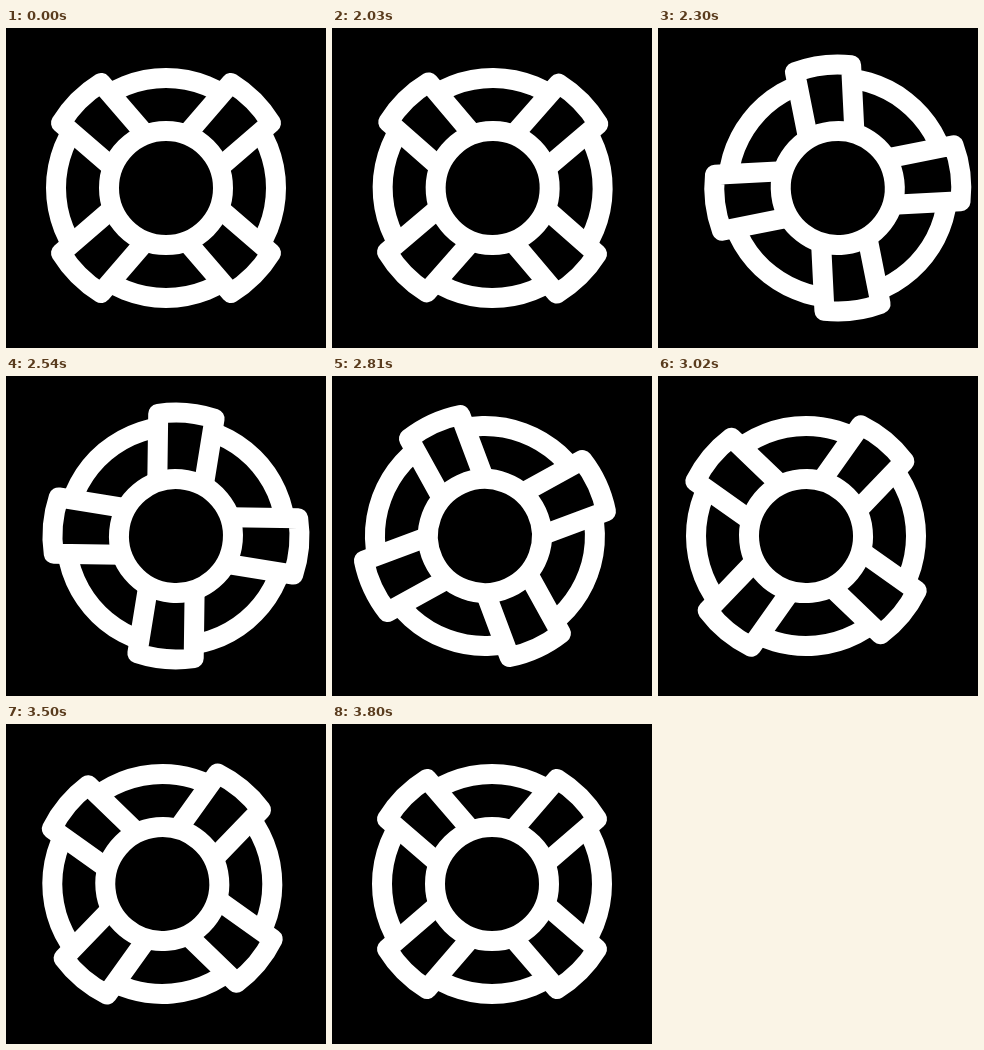
These frames come from a looping animation (320 by 320 pixels, 3.83 s). An HTML page:

```html
<!DOCTYPE html>
<html lang="en">
<head>
<meta charset="utf-8">
<title>Lifebuoy</title>
<style>
  html, body { margin: 0; width: 100%; height: 100%; overflow: hidden; background: #000; }
  svg { display: block; width: 100vw; height: 100vh; }
</style>
</head>
<body>
<svg viewBox="0 0 320 320">
  <defs>
    <path id="band" d="M-21 -54 L-65 -105 A123.5 123.5 0 0 0 -105 -65 L-54 -21"/>
  </defs>
  <g id="buoy" transform="translate(160 160)" fill="#000" stroke="#fff" stroke-width="20" stroke-linejoin="round">
    <circle r="110"/>
    <use href="#band"/>
    <use href="#band" transform="rotate(90)"/>
    <use href="#band" transform="rotate(180)"/>
    <use href="#band" transform="rotate(270)"/>
    <circle r="57"/>
  </g>
</svg>
<script>
  const LOOP = 3830, REST = 2030, STEP = 30;
  // [time in ms, value]
  const shift = [[2000, 0], [2260, 20], [3000, -12], [3800, 0]];
  const turn = [[2000, 0], [2460, 52], [3160, -11.5], [3800, 0]];
  const buoy = document.getElementById('buoy');

  // Sine ease in and out between neighbouring keys
  function valueAt(keys, t) {
    for (let i = 1; i < keys.length; i++) {
      const [t0, a] = keys[i - 1], [t1, b] = keys[i];
      if (t >= t0 && t < t1) {
        return a + (b - a) * (1 - Math.cos(Math.PI * (t - t0) / (t1 - t0))) / 2;
      }
    }
    return 0;
  }

  const start = performance.now();
  function draw() {
    let t = (performance.now() - start) % LOOP;
    t = t < REST ? 0 : REST + Math.floor((t - REST) / STEP) * STEP;
    const x = 160 + valueAt(shift, t);
    buoy.setAttribute('transform', `translate(${x} 160) rotate(${valueAt(turn, t)})`);
    requestAnimationFrame(draw);
  }
  draw();
</script>
</body>
</html>
```
